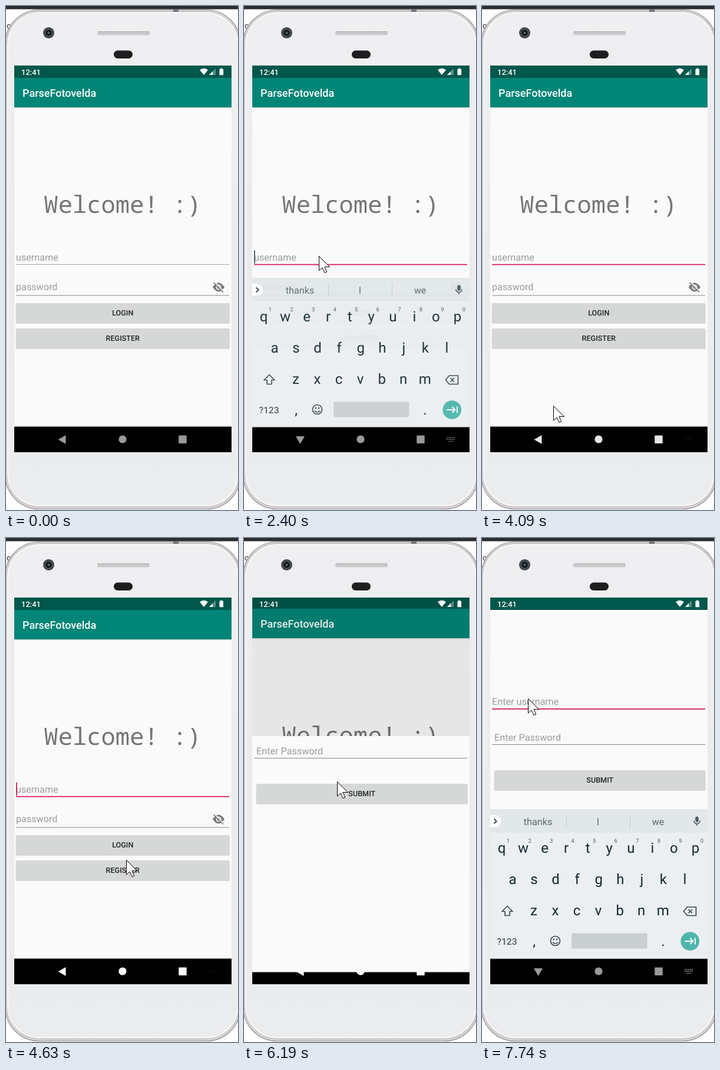
An HTML page that plays this animation: 394 by 855 pixels, repeating every 8 s.

```html
<!DOCTYPE html>
<html lang="en">
<head>
<meta charset="utf-8">
<title>Login flow</title>
<style>
  html, body { margin: 0; width: 100%; height: 100%; overflow: hidden; background: #fff; }
  svg { display: block; width: 394px; height: 855px; font-family: Roboto, sans-serif; text-rendering: geometricPrecision; }
  .hint { font-size: 16.2px; fill: #9b9b9b; }
  .button { font-size: 12.6px; font-weight: 500; fill: #212424; text-anchor: middle; }
  .key { font-size: 24px; fill: #10282f; text-anchor: middle; }
  .digit { font-size: 9.5px; fill: #4f5f66; text-anchor: middle; }
  .word { font-size: 16.2px; fill: #5b676d; text-anchor: middle; }
  .mode { font-size: 15.6px; font-weight: 500; fill: #4c5a60; text-anchor: middle; }
  .icon { fill: none; stroke: #37474f; stroke-width: 1.7; }
</style>
</head>
<body>
<svg viewBox="0 0 394 855">
  <defs>
    <linearGradient id="shell" x2="0" y2="1">
      <stop offset="0" stop-color="#efeff1"/><stop offset=".5" stop-color="#eaebed"/><stop offset="1" stop-color="#ebecee"/>
    </linearGradient>
    <linearGradient id="shade" x2="0" y2="1">
      <stop offset="0" stop-color="#dcdddd"/><stop offset="1" stop-color="#fafafa"/>
    </linearGradient>
    <clipPath id="screen"><rect x="14" y="101" width="369" height="656"/></clipPath>
    <clipPath id="reveal"><rect id="revealRect" x="14" width="369" height="700"/></clipPath>
    <clipPath id="registerClip"><rect x="17" y="547" width="362.5" height="33.5" rx="2"/></clipPath>
  </defs>

  <!-- Phone -->
  <rect width="394" height="855" fill="#fff"/>
  <rect width="394" height="5.5" fill="#2b2d31"/>
  <text x="1" y="38" font-size="13" fill="#222">c</text>
  <path d="M0 80v10M0 795v14" stroke="#555" stroke-width="2"/>
  <rect x="-1.5" y="6.5" width="400" height="847" rx="58" fill="#d6d4d6" stroke="#949194" stroke-width="1.2"/>
  <rect x="1" y="9.5" width="395" height="840" rx="56" fill="url(#shell)" stroke="#b3b0b3"/>
  <rect x="3" y="11.5" width="391" height="836" rx="54" fill="none" stroke="#f6f6f7" stroke-width="2.5"/>
  <rect x="284" y="5" width="9" height="5" fill="#77757a"/>
  <circle cx="72.5" cy="45.5" r="9.5" fill="#3f4549"/>
  <circle cx="72.5" cy="45.5" r="6" fill="#151a1d" stroke="#667075"/>
  <circle cx="72.5" cy="45.5" r="2" fill="#56666c"/>
  <rect x="155" y="43" width="89" height="6.5" rx="2.5" fill="#c9c9cc"/>
  <path d="M156 43.5h87" stroke="#aaaaae"/>
  <rect x="183" y="75.5" width="32" height="13.5" rx="6.7" fill="#1e1e21"/>

  <g clip-path="url(#screen)">
    <rect x="14" y="101" width="369" height="656"/>
    <g id="login">
      <rect x="14" y="101" width="369" height="613" fill="#fafafa"/>
      <rect x="14" y="101" width="369" height="21" fill="#00574b"/>
      <rect x="14" y="122" width="369" height="50" fill="#008577"/>
      <rect x="14" y="172" width="369" height="3" fill="url(#shade)"/>
      <text x="28" y="154" font-size="18" font-weight="500" fill="#fff">ParseFotovelda</text>
      <text x="198" y="350.6" font-size="40.5" fill="#757575" text-anchor="middle"
        style="font-family:'Noto Sans Mono',monospace">Welcome! :)</text>
      <text class="hint" x="17" y="432">username</text>
      <path d="M17 438.5H379" stroke="#a5a5a5"/>
      <path id="loginFocus" stroke="#d81b60" stroke-width="1.8"/>
      <rect id="loginCaret" x="17" y="414.5" width="1.8" height="22.5"/>
      <text class="hint" x="17" y="482">password</text>
      <path d="M17 491H379" stroke="#858585"/>
      <g fill="#757575">
        <path d="M351 477Q361 462 371 477Q361 492 351 477Z"/>
        <circle cx="361" cy="477" r="4.5" fill="#fafafa"/><circle cx="361" cy="477" r="2.8"/>
        <path d="M353.5 468L370 484.5" stroke="#fafafa" stroke-width="2"/>
        <path d="M352.5 469L369 485.5" stroke="#757575" stroke-width="1.7"/>
      </g>
      <g id="loginButtons"></g>
      <circle id="ripple" cx="205" cy="556" clip-path="url(#registerClip)"/>
    </g>
    <rect id="dim" x="14" y="101" width="369" height="613"/>

    <g id="nav" fill="#999">
      <rect x="14" y="713.5" width="369" height="43.5" fill="#000"/>
      <path id="back" d="M88.5 735.5L101.5 728V743Z"/>
      <circle cx="198" cy="735" r="6.6"/>
      <rect x="293.3" y="728.5" width="13.4" height="13.4" rx="1"/>
      <path id="imeIcon" d="M344.3 732h14M344.3 735h14M347.5 738.5h8" stroke="#aaa" stroke-width="1.7" stroke-dasharray="1.8 1.2"/>
    </g>

    <g id="signup"><g clip-path="url(#reveal)">
      <rect x="14" y="101" width="369" height="612.5" fill="#fafafa"/>
      <rect x="14" y="101" width="369" height="21" fill="#00574b"/>
      <text class="hint" x="17" y="283">Enter username</text>
      <path d="M17 290H379" stroke="#a5a5a5"/>
      <path id="signupFocus" stroke="#d81b60" stroke-width="1.8"/>
      <rect id="signupCaret" x="17" y="266" width="1.8" height="22.5" fill="#d81b60"/>
      <text class="hint" x="21" y="344">Enter Password</text>
      <path d="M17 350.5H379" stroke="#858585"/>
      <g id="signupButtons"></g>
    </g></g>

    <!-- Status icons -->
    <g fill="#fff">
      <text x="26" y="116.5" font-size="13" font-weight="500">12:41</text>
      <path d="M329 108.5Q336 103 343 108.5L336 117Z"/>
      <path d="M345 117L356 106V117Z" opacity=".35"/><path d="M345 117L351 111V117Z"/>
      <path d="M362.5 107h1.8v-1.5h3v1.5h1.8v10.3h-6.6z"/>
    </g>

    <g id="keyboard">
      <rect x="14" y="460" width="369" height="253.5" fill="#eceff1"/>
      <rect x="14" y="460" width="369" height="40" fill="#e2e7ea"/>
      <path d="M14 470h8a10.3 10.3 0 0 1 0 20.6h-8z" fill="#fff"/>
      <path class="icon" d="M20.5 476.5l4 4-4 4" style="stroke-width:2"/>
      <path d="M143.5 469v23M251.5 469v23" stroke="#c3cacd"/>
      <rect x="362.3" y="472.5" width="5.4" height="9.5" rx="2.7" fill="#455a64"/>
      <path class="icon" d="M359.8 479.5a5.2 5.2 0 0 0 10.4 0M365 484.7v3.3" style="stroke-width:1.4"/>
      <path class="icon" d="M43 624.5L52 633.5H47V640.5H39V633.5H34Z" stroke-linejoin="round"/>
      <path class="icon" d="M348.5 626H363.5V640.5H348.5L342.5 633.2ZM350.5 630l6.5 6.5M357 630l-6.5 6.5"/>
      <circle class="icon" cx="124.5" cy="683.5" r="8"/>
      <path class="icon" d="M120 685.5q4.5 5.5 9 0"/>
      <circle cx="121.7" cy="681" r="1.3" fill="#37474f"/><circle cx="127.3" cy="681" r="1.3" fill="#37474f"/>
      <rect x="152" y="670.5" width="128.5" height="26" rx="3" fill="#c9ced1"/>
      <circle cx="353.3" cy="684" r="15.8" fill="#4db6ac"/>
      <path d="M344 684H358M353.5 679l5 5-5 5M362 678.5v11" fill="none" stroke="#fff" stroke-width="1.9"/>
    </g>
  </g>

  <path id="pointer" d="M.5.5V25L6 20L10 28.5L13.8 27L10 18.5H18.5Z" fill="#fff" stroke="#000"/>
</svg>
<script>
const LOOP = 8000, STEP = 77.4;
const el = id => document.getElementById(id);
const set = (id, attrs) => Object.entries(attrs).forEach(([k, v]) => el(id).setAttribute(k, v));
const add = (id, markup) => el(id).insertAdjacentHTML('beforeend', markup);
const ramp = (t, start, end) => Math.min(1, Math.max(0, (t - start) / (end - start)));
const shiftY = y => `translate(0 ${Math.round(y)})`;
const label = (cls, x, y, text) => `<text class="${cls}" x="${x}" y="${y}">${text}</text>`;

function button(id, x, y, text) {
  const width = 379.5 - x;
  add(id, `<rect x="${x - .5}" y="${y + .7}" width="${width + 1}" height="34.3" rx="2" fill="#000" opacity=".13"/>
    <rect x="${x}" y="${y}" width="${width}" height="33.5" rx="2" fill="#d6d7d7"/>` +
    label('button', (x + 379.5) / 2, y + 21, text));
}
button('loginButtons', 17, 504, 'LOGIN');
button('loginButtons', 17, 547, 'REGISTER');
button('signupButtons', 21, 394, 'SUBMIT');

[['qwertyuiop', 33.5, 534], ['asdfghjkl', 52, 587], ['zxcvbnm', 88, 640]].forEach(([row, x, y], r) =>
  [...row].forEach((char, i) => {
    const cx = x + 36.55 * i;
    add('keyboard', label('key', cx, y, char));
    if (!r) add('keyboard', label('digit', cx + 11, 517, (i + 1) % 10));
  }));
['thanks', 'I', 'we'].forEach((word, i) => add('keyboard', label('word', 95 + 102 * i, 486.5, word)));
add('keyboard', label('mode', 42.5, 689.5, '?123') + label('key', 88.5, 692, ',') + label('key', 307.5, 692, '.'));

// time, x, y of the pointer tip
const route = [
  [310, 330, 763], [1080, 127, 427], [1160, 127, 424], [2640, 127, 424], [2790, 170, 391],
  [2940, 230, 470], [3240, 88, 717], [3390, 88, 717], [3483, 79, 729], [3620, 84, 736],
  [3870, 84, 736], [4630, 204, 546], [4710, 204, 546], [4860, 205, 556], [5870, 205, 556],
  [6180, 158, 413], [6500, 157, 416], [6650, 115, 352], [6720, 115, 352], [7040, 78, 272], [LOOP, 78, 272]
];
function pointerAt(t) {
  const i = Math.max(1, route.findIndex(p => p[0] > t));
  const [a, b] = [route[i - 1], route[i]], p = ramp(t, a[0], b[0]);
  return [1, 2].map(k => Math.round(a[k] + (b[k] - a[k]) * p));
}

function fastOutSlowIn(x) {
  let lo = 0, hi = 1, s = .5;
  for (let i = 0; i < 20; i++) {
    s = (lo + hi) / 2;
    if (1.2 * s * (1 - s) ** 2 + .6 * s * s * (1 - s) + s ** 3 < x) lo = s; else hi = s;
  }
  return 3 * s * s * (1 - s) + s ** 3;
}

function focusLine(id, y, from, p) {
  set(id, { d: `M${from + (17 - from) * p} ${y}H${from + (379 - from) * p}`, opacity: p ? 1 : 0 });
}

function draw(time) {
  const t = Math.floor((time + 20) / STEP) * STEP;

  focusLine('loginFocus', 438.7, 127, ramp(t, 1100, 1380));
  focusLine('signupFocus', 290.2, 78, ramp(t, 7040, 7270));
  const blink = Math.floor((t - 2390) / 500);
  set('loginCaret', { opacity: t > 2390 && t < 4860 && blink % 2 === 0 ? 1 : 0, fill: t < 2470 ? '#46585f' : '#d81b60' });
  set('signupCaret', { opacity: t > 7200 && t < 7700 ? 1 : 0 });

  const press = ramp(t, 5030, 5340);
  set('ripple', { r: 20 + 240 * press, opacity: .16 * Math.sin(Math.PI * press) });

  // The sign-up window rises slightly while a faster clip uncovers it
  const slide = ramp(t, 6114, 6489), rise = fastOutSlowIn(slide);
  set('login', { transform: shiftY(-12.5 * rise) });
  set('dim', { opacity: .08 * ramp(slide, 0, .2) });
  set('signup', { transform: shiftY(27 * (1 - rise)), visibility: slide ? 'visible' : 'hidden' });
  set('revealRect', { y: Math.round(101 + 629 * (1 - slide) ** 4.67) });

  const shown = t < 3860 ? ramp(t, 2220, 2460) : t < 5000 ? 1 - ramp(t, 3860, 4100) : ramp(t, 7410, 7650);
  const hidden = (1 - shown) ** 2;
  set('keyboard', { transform: shiftY(20 * hidden), opacity: 1 - hidden });
  const white = ramp(t, 3860, 4180) * (1 - ramp(t, 7400, 7640));
  const grey = Math.round(153 + 102 * white);
  set('nav', { fill: `rgb(${grey},${grey},${grey})` });
  set('back', { transform: `rotate(${-90 * ramp(shown, 0, .7)} 95.8 735.8)` });
  set('imeIcon', { opacity: Math.max(shown, t > 4000 && t < 7000 ? .1 : 0) });

  set('pointer', { transform: `translate(${pointerAt(t)})`, visibility: t < 300 ? 'hidden' : 'visible' });
}

function tick() {
  draw(performance.now() % LOOP);
  requestAnimationFrame(tick);
}
tick();
</script>
</body>
</html>
```
